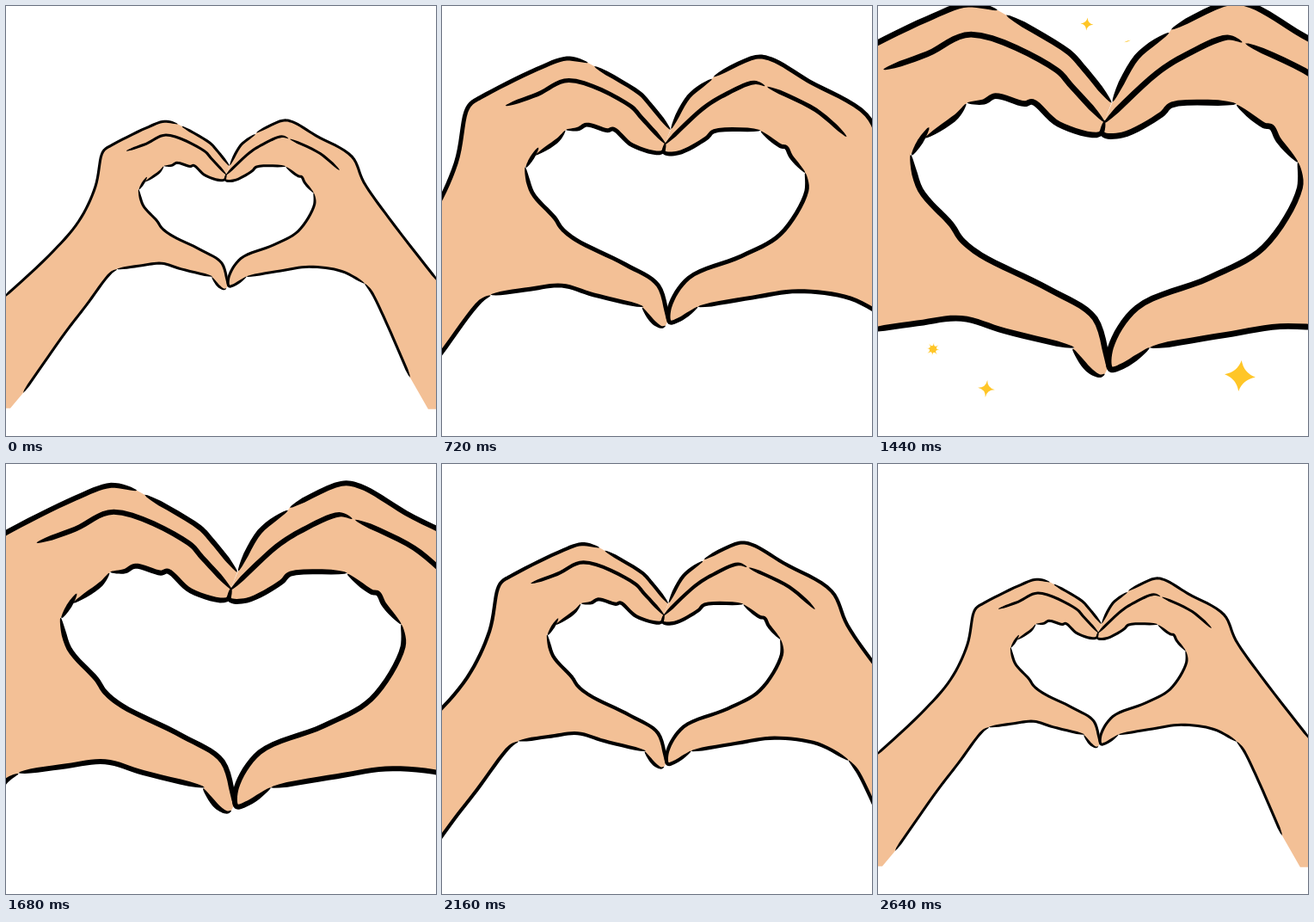
An HTML page for the animation above (2.76 s loop, 500 px wide and 500 px high).

```html
<!DOCTYPE html>
<html lang="en">
<head>
<meta charset="utf-8">
<title>Heart hands</title>
<style>
html, body { margin: 0; width: 100%; height: 100%; overflow: hidden; background: #fff; }
svg { display: block; width: 100vw; height: 100vh; }
</style>
</head>
<body>
<svg viewBox="0 0 500 500">
  <g id="hands"></g>
  <g id="stars" fill="#ffc627"></g>
</svg>
<script>
const STEP = 120, COUNT = 23, MID = 11;
const BASE = 1.951; // zoom at which the hands below are laid out
const LINE = 6, TAPER = 20, SKIN = '#f3c096';

// Key points of the brush strokes. The edge strokes, in order, also bound the skin.
const LEFT = {
  edge: [
    '-245,425 -140,328 -73,251 -35,172 -21,100 -14,88 0,79 80,39 122,24 152,30',
    '161,35 225,73 240,89 269,125',
    '262,143 257,157 215,147 188,124 180,126 150,118 138,124 121,125',
    '120,126 110,139 78,161',
    '63,178 73,214 105,250 115,265 135,281 205,316 252,346 265,397',
    '262,403 257,405 245,398 229,377',
    '231,376 160,359 115,346 70,351 14,359',
    '14,360 0,368 -57,443 -101,500 -199,640',
    '-228,675 -245,675'
  ],
  folds: ['35,91 80,75 125,55 212,91 228,108 262,145', '82,150 64,179']
};
const RIGHT = {
  edge: [
    '745,390 630,242 574,162 547,104 465,56 412,25 390,22 330,50',
    '328,53 295,78 270,124',
    '262,143 260,157 280,158 320,137 331,127 397,126',
    '397,127 425,148 433,150 440,163 460,186',
    '460,186 462,212 425,273 370,304 295,335 268,376 268,398 282,394 308,376',
    '308,376 385,363 450,354 524,364 576,392',
    '576,392 590,409 618,465 679,605',
    '720,677 745,677'
  ],
  folds: ['261,146 315,95 345,76 388,58 403,63', '406,64 475,97 519,135']
};

// x, y, radius, tilt, waist, spikes
const STARS = [
  [421, 430, 18, 0.1, 0.3, 4],
  [126, 445, 10, 0.12, 0.12, 4],
  [243, 21, 7.5, 0.1, 0.15, 4],
  [290, 41, 4, -0.3, 0.25, 2],
  [64, 399, 8, -0.64, 0.05, 8]
];

function add(parent, d, fill) {
  const el = document.createElementNS('http://www.w3.org/2000/svg', 'path');
  el.setAttribute('d', d);
  if (fill) el.setAttribute('fill', fill);
  parent.appendChild(el);
  return el;
}

// Centripetal spline through the key points: uneven spacing does not overshoot.
function curve(text) {
  const p = text.split(' ').map(s => s.split(',').map(Number));
  const gap = (u, v) => Math.sqrt(Math.hypot(u[0] - v[0], u[1] - v[1])) || 1;
  const out = [];
  for (let i = 0; i < p.length - 1; i++) {
    const a = p[i - 1] || p[i], b = p[i], c = p[i + 1], e = p[i + 2] || c;
    const t0 = gap(a, b), t1 = gap(b, c), t2 = gap(c, e);
    const slopes = [0, 1].map(k => [
      t1 * ((b[k] - a[k]) / t0 - (c[k] - a[k]) / (t0 + t1) + (c[k] - b[k]) / t1),
      t1 * ((c[k] - b[k]) / t1 - (e[k] - b[k]) / (t1 + t2) + (e[k] - c[k]) / t2)
    ]);
    for (let t = 0; t < 1; t += 0.125) {
      const q = t * t, r = q * t;
      out.push(slopes.map(([m, n], k) =>
        (2 * r - 3 * q + 1) * b[k] + (r - 2 * q + t) * m +
        (3 * q - 2 * r) * c[k] + (r - q) * n));
    }
  }
  out.push(p[p.length - 1]);
  return out;
}

const poly = pts => 'M' + pts.map(p => p.map(v => v.toFixed(2)).join()).join('L') + 'Z';

// A stroke that thins towards both ends.
function brush(text) {
  const pts = curve(text), dist = [0];
  for (let i = 1; i < pts.length; i++)
    dist.push(dist[i - 1] + Math.hypot(pts[i][0] - pts[i - 1][0], pts[i][1] - pts[i - 1][1]));
  const total = dist[dist.length - 1], taper = Math.min(TAPER, total * 0.4);
  const one = [], two = [];
  pts.forEach((p, i) => {
    const a = pts[Math.max(0, i - 1)], b = pts[Math.min(pts.length - 1, i + 1)];
    const dx = b[0] - a[0], dy = b[1] - a[1], l = Math.hypot(dx, dy) || 1;
    const end = Math.min(dist[i], total - dist[i]) / taper;
    const w = LINE / 2 * Math.sqrt(Math.min(1, end));
    one.push([p[0] - dy / l * w, p[1] + dx / l * w]);
    two.unshift([p[0] + dy / l * w, p[1] - dx / l * w]);
  });
  return poly(one.concat(two));
}

function star(r, tilt, waist, spikes) {
  const at = (n, k) => {
    const a = tilt + n * Math.PI / spikes;
    return `${r * k * Math.cos(a)},${r * k * Math.sin(a)}`;
  };
  let d = 'M' + at(0, 1);
  for (let n = 1; n < spikes * 2; n += 2) d += `Q${at(n, waist)} ${at(n + 1, 1)}`;
  return d + 'Z';
}

const hands = document.getElementById('hands');
const stars = document.getElementById('stars');
for (const h of [LEFT, RIGHT]) add(hands, poly(h.edge.flatMap(curve)), SKIN);
for (const h of [LEFT, RIGHT])
  [...h.edge.slice(0, -1), ...h.folds].forEach(s => add(hands, brush(s), '#000'));
const sparks = STARS.map(([x, y, ...shape]) => ({ x, y, el: add(stars, star(...shape)) }));

function draw(time) {
  const i = Math.floor(time / STEP) % COUNT;
  const n = Math.min(i, 2 * MID - i);
  const late = Math.max(0, n - 6);
  // The viewing distance shrinks evenly, then settles.
  const zoom = 1 / (1 - n / 16 + 0.0024 * late ** 2.5);
  const y = 250 - 0.6 * n + 2.6 * late;
  hands.setAttribute('transform',
    `translate(250 ${y}) scale(${zoom / BASE}) translate(-250 -250)`);

  const glow = i < 10 ? 0 : Math.max(0, (14 - i) / 2);
  stars.setAttribute('visibility', glow ? 'visible' : 'hidden');
  for (const s of sparks)
    s.el.setAttribute('transform', `translate(${s.x} ${s.y}) scale(${glow})`);
}

const start = performance.now();
function tick() {
  draw(performance.now() - start);
  requestAnimationFrame(tick);
}
tick();
</script>
</body>
</html>
```
